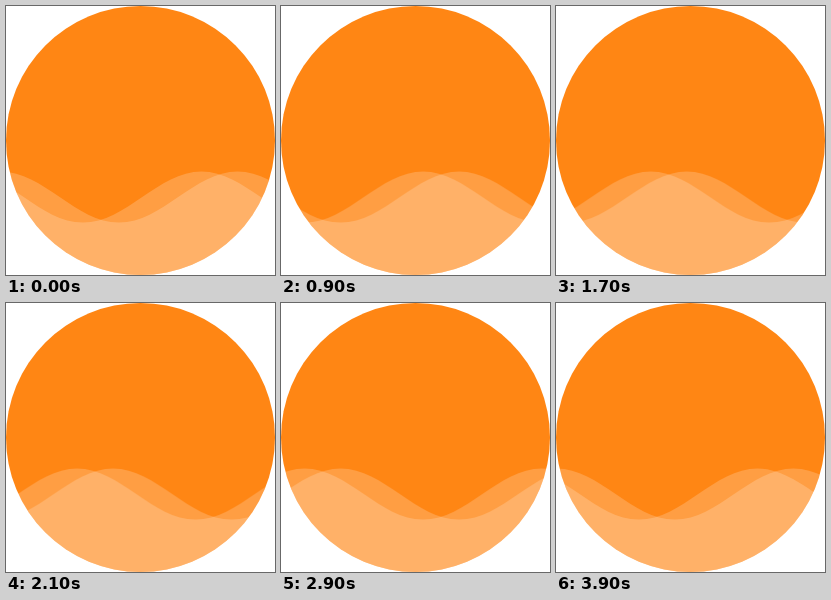
An HTML page that plays this animation: 269 px wide and 269 px high, repeating every 4000 ms.

```html
<!DOCTYPE html>
<html lang="en">
<head>
<meta charset="utf-8">
<title>Waves</title>
<style>
  html, body { margin: 0; width: 100%; height: 100%; overflow: hidden; background: #fff; }
  svg { display: block; width: 100vw; height: 100vh; }
  .waves { fill: #fff; fill-opacity: .2; }
</style>
</head>
<body>
<svg viewBox="0 0 269 269">
  <defs>
    <clipPath id="disc"><circle cx="134.5" cy="134.5" r="134.5"/></clipPath>
    <path id="wave"/>
  </defs>
  <circle cx="134.5" cy="134.5" r="134.5" fill="#ff8614"/>
  <g clip-path="url(#disc)">
    <g class="waves">
      <use href="#wave" x="-41.5"/>
      <use href="#wave" x="-5.5"/>
    </g>
  </g>
</svg>
<script>
  const LENGTH = 237, CREST = 165.4, HEIGHT = 51.2, PERIODS = 3;
  const half = LENGTH / 2;
  const handle = half * 0.364; // close to a sine

  const fall = `c${handle} 0 ${half - handle} ${HEIGHT} ${half} ${HEIGHT}`;
  const rise = `s${half - handle} ${-HEIGHT} ${half} ${-HEIGHT}`;
  document.getElementById('wave')
    .setAttribute('d', `M0 ${CREST}${(fall + rise).repeat(PERIODS)}V275H0Z`);

  // One wavelength per loop, ten positions a second
  document.querySelector('.waves').animate(
    [{ transform: 'translateX(0)' }, { transform: `translateX(${-LENGTH}px)` }],
    { duration: 4000, iterations: Infinity, easing: 'steps(40, end)' }
  );
</script>
</body>
</html>
```
